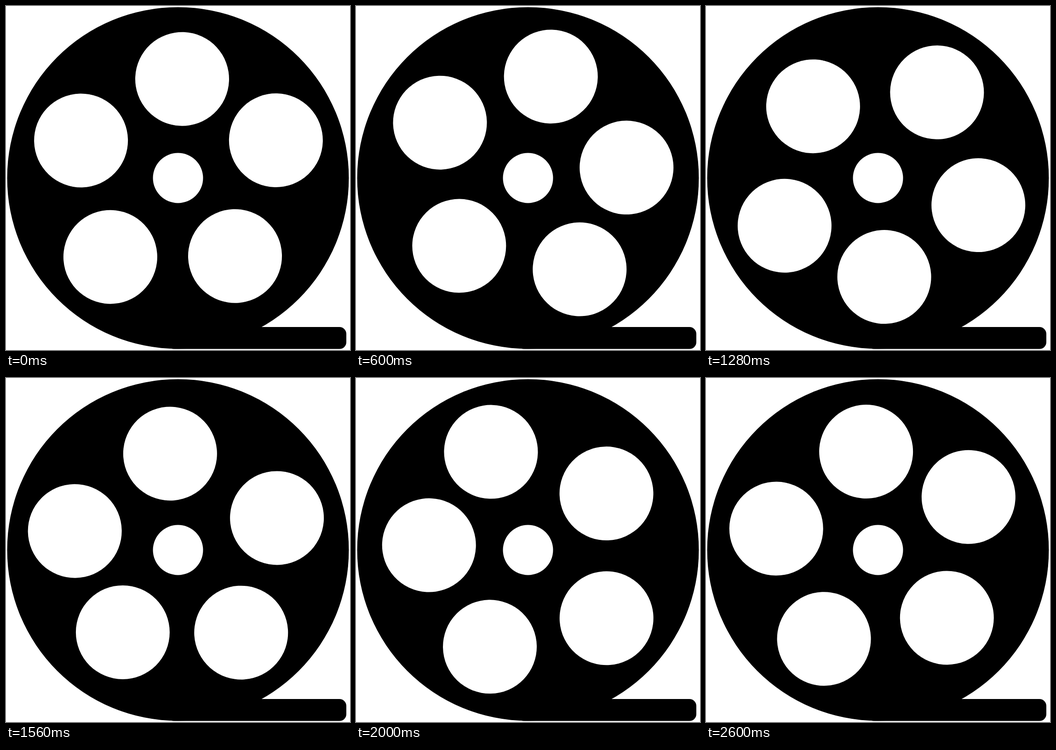
Write an HTML page that moves like this. It is 748 px wide and 748 px high and loops after 2.64 s.

```html
<!DOCTYPE html>
<html lang="en">
<head>
<meta charset="utf-8">
<title>Film reel</title>
<style>
  html, body { margin: 0; height: 100%; overflow: hidden; background: #fff; }
  svg { display: block; width: 100%; height: 100%; }
</style>
</head>
<body>
<svg viewBox="0 0 748 748">
  <circle cx="374" cy="374" r="371.5"/>
  <rect x="350" y="698" width="390" height="47.8" rx="15"/>
  <g fill="#fff" transform="translate(374 374)">
    <circle r="54.5"/>
    <g id="holes"></g>
  </g>
</svg>
<script>
const STEP = 40, STEPS = 66, SLOWDOWN = 32;
const FAST = 5.437, SLOW = 5.355; // degrees per step

// Each hole: angle in degrees, distance from the hub
const layout = [[-87.6, 215.5], [-21.05, 228.1], [53.85, 210.2], [130.6, 226.1], [201.15, 226.1]];
const holes = document.getElementById('holes');
holes.innerHTML = layout
  .map(([angle, distance]) => `<circle r="102" cx="${distance}" transform="rotate(${angle})"/>`)
  .join('');

function draw(now) {
  const step = Math.floor(now / STEP + 0.01) % STEPS;
  const angle = FAST * Math.min(step, SLOWDOWN) + SLOW * Math.max(step - SLOWDOWN, 0);
  holes.setAttribute('transform', `rotate(${angle})`);
  requestAnimationFrame(draw);
}
draw(0);
</script>
</body>
</html>
```
